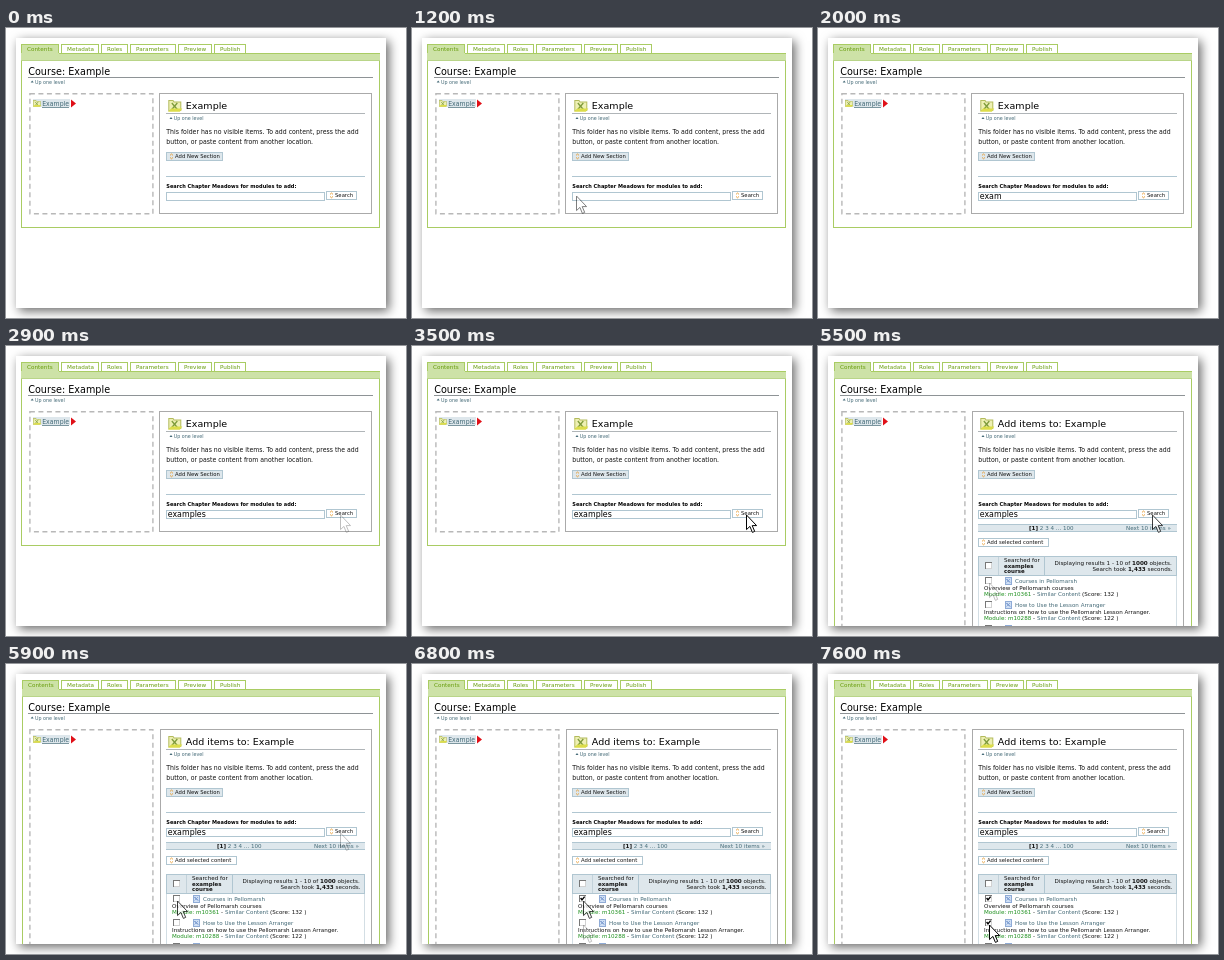
Write an HTML page with a canvas that moves like this. It is 400 by 290 pixels and loops after 8 s.

```html
<!DOCTYPE html>
<html lang="en">
<head>
<meta charset="utf-8">
<title>Adding content to a course</title>
<style>
html, body { margin: 0; width: 100%; height: 100%; overflow: hidden; background: #fff; }
canvas { display: block; width: 400px; height: 290px; }
</style>
</head>
<body>
<canvas id="stage" width="400" height="290"></canvas>
<script>
const LOOP = 8000, STEP = 200;
const LINK = '#436976', INK = '#111', GREEN = '#669c0a', LEAF = '#cde2a7', EDGE = '#a9cc63';
const SKY = '#dee7ec', SKY_EDGE = '#b0c6d1', GRAY = '#aaaaaa', MODULE = '#1c8f1c', ORANGE = '#e89a2c';
const ctx = document.getElementById('stage').getContext('2d');

// Text is laid out ten times larger and scaled down, so small sizes keep exact spacing.
function text(str, x, y, size, color = INK, bold = false) {
  ctx.save();
  ctx.translate(x, y);
  ctx.scale(0.1, 0.1);
  ctx.font = `${bold ? 'bold ' : ''}${size * 10}px "DejaVu Sans", Verdana, sans-serif`;
  ctx.fillStyle = color;
  ctx.fillText(str, 0, 0);
  const width = ctx.measureText(str).width / 10;
  ctx.restore();
  return x + width;
}

// Each part is [string, color, bold].
function run(parts, x, y, size) {
  for (const [str, color, bold] of parts) x = text(str, x, y, size, color, bold);
}

function rect(x, y, w, h, color) {
  ctx.fillStyle = color;
  ctx.fillRect(x, y, w, h);
}

function box(x, y, w, h, fill, edge) {
  rect(x, y, w, h, edge);
  rect(x + 1, y + 1, w - 2, h - 2, fill);
}

function shape(points, fill, c = ctx) {
  c.beginPath();
  points.forEach(([x, y]) => c.lineTo(x, y));
  c.closePath();
  c.fillStyle = fill;
  c.fill();
}

function line(points, color, width, c = ctx) {
  c.beginPath();
  points.forEach(([x, y]) => c.lineTo(x, y));
  c.strokeStyle = color;
  c.lineWidth = width;
  c.stroke();
}

function tab(name, x, w, active) {
  box(x, 16, w, 11, active ? LEAF : '#fff', EDGE);
  text(name, x + 6, 23, 5.7, GREEN);
}

function upLink(x, y) {
  shape([[x, y - 1], [x + 1.5, y - 3], [x + 3, y - 1]], LINK);
  text('Up one level', x + 4.2, y, 4.8, LINK);
}

function folder(x, y, s) {
  ctx.save();
  ctx.translate(x, y);
  ctx.scale(s, s);
  shape([[1, 1], [6, 1], [7, 2.5], [14, 2.5], [14, 12], [1, 12]], '#b3bb5c');
  shape([[2, 2], [5.5, 2], [6.5, 3.5], [13, 3.5], [13, 11], [2, 11]], '#eef0b4');
  line([[4.5, 4], [10, 10.5]], '#7d9a3a', 1.3);
  line([[10, 4], [4.5, 10.5]], '#7d9a3a', 1.3);
  shape([[0.5, 12.7], [4, 9.5], [15, 9.5], [12.5, 12.7]], '#dcdd4a');
  ctx.restore();
}

function button(label, x, y, w, fill) {
  box(x, y, w, 9, fill, SKY_EDGE);
  line([[x + 4, y + 3.4], [x + 5.5, y + 2], [x + 7, y + 3.4]], ORANGE, 0.9);
  line([[x + 4, y + 5.4], [x + 5.5, y + 6.8], [x + 7, y + 5.4]], ORANGE, 0.9);
  text(label, x + 9, y + 6.2, 5.3);
}

function checkbox(x, y, checked) {
  box(x, y, 7, 7, '#fff', '#d2d2d2');
  rect(x, y, 7, 1, '#777');
  rect(x, y, 1, 7, '#777');
  if (checked) line([[x + 1.6, y + 3], [x + 3, y + 4.9], [x + 5.6, y + 1.6]], '#000', 1.4);
}

function moduleIcon(y) {
  box(187, y, 7, 8, '#cfdff5', '#8fabd6');
  line([[188.5, y + 2], [192, y + 5.5]], '#4a73b8', 1);
  line([[192, y + 2], [188.5, y + 5.5]], '#7d9ed2', 0.8);
}

function result(y, title, summary, id, score, checked) {
  checkbox(167, y + 2, checked);
  moduleIcon(y + 2);
  text(title, 197, y + 7.7, 5.6, LINK);
  text(summary, 166, y + 14.8, 5.6);
  run([[`Module: ${id}`, MODULE], [' - ', INK], ['Similar Content', LINK],
       [` (Score: ${score} )`, INK]], 166, y + 21, 5.6);
}

function results(checks) {
  rect(160, 178, 199, 8, SKY);
  rect(160, 178, 199, 1, SKY_EDGE);
  rect(160, 185, 199, 1, SKY_EDGE);
  run([['[1]', INK, true], [' 2 3 4 ... 100', LINK]], 211, 184, 5.6);
  text('Next 10 items »', 308, 184, 5.65, LINK);
  button('Add selected content', 160, 192, 71, '#fff');

  box(160, 210, 199, 80, '#fff', '#d3dee4');
  box(160, 210, 199, 20, SKY, SKY_EDGE);
  rect(180, 211, 1, 18, '#c3d2da');
  rect(226, 211, 1, 18, SKY_EDGE);
  checkbox(167, 216, false);
  text('Searched for', 186, 215.7, 5.6);
  text('examples', 186, 221.5, 5.5, INK, true);
  text('course', 186, 227.3, 5.5, INK, true);
  run([['Displaying results 1 - 10 of '], ['1000', INK, true], [' objects.']], 236.5, 219, 5.65);
  run([['Search took '], ['1,433', INK, true], [' seconds.']], 274.5, 225, 5.65);

  result(229, 'Courses in Pellomarsh', 'Overview of Pellomarsh courses', 'm10361', 132, checks > 0);
  result(253, 'How to Use the Lesson Arranger',
    'Instructions on how to use the Pellomarsh Lesson Arranger.', 'm10288', 122, checks > 1);
  checkbox(167, 279, false);
  moduleIcon(279);
}

function page(typed, found, checks) {
  const left = found ? 16 : 15, panel = found ? 154 : 153;
  rect(0, 0, 400, 290, '#fff');
  ctx.save();
  ctx.shadowColor = 'rgba(0,0,0,.6)';
  ctx.shadowBlur = 10;
  ctx.shadowOffsetX = ctx.shadowOffsetY = 3;
  rect(10, 10, 370, 270, '#fff');
  ctx.restore();

  ctx.save();
  ctx.beginPath();
  ctx.rect(10, 10, 370, 270);
  ctx.clip();

  box(left, 25, 374 - left, found ? 300 : 175, '#fff', EDGE);
  tab('Contents', left, 53 - left, true);
  tab('Metadata', 55, 38);
  tab('Roles', 95, 27);
  tab('Parameters', 124, 46);
  tab('Preview', 172, 34);
  tab('Publish', 208, 32);
  rect(left, 25, 374 - left, 8, LEAF);
  rect(53, 25, 321, 1, EDGE);
  rect(left, 32, 374 - left, 1, '#b9d589');

  text('Course: Example', 22.2, 47, 9.65, '#000');
  rect(22, 49, 345, 1, '#8e9396');
  upLink(24.7, 55.5);

  ctx.setLineDash([5, 3.5]);
  ctx.strokeStyle = '#b8b8b8';
  ctx.lineWidth = 1.4;
  ctx.strokeRect(23.9, 65.7, 123, found ? 300 : 120);
  ctx.setLineDash([]);
  rect(27, 71, 37, 8, SKY);
  folder(26.5, 71.5, 0.58);
  text('Example', 36.2, 77.8, 6.2, LINK);
  rect(36, 79, 27, 0.7, LINK);
  shape([[65, 71.5], [70, 75.5], [65, 79.5]], '#e01018');

  box(panel, 65, 366 - panel, found ? 300 : 121, '#fff', GRAY);
  folder(161.3, 71, 1);
  text(found ? 'Add items to: Example' : 'Example', 179.8, 80.6, 9.55, '#000');
  rect(160, 85, 199, 1, '#b0b5b8');
  upLink(163.5, 92);
  text('This folder has no visible items. To add content, press the add', 160.3, 106, 6.2);
  text('button, or paste content from another location.', 160.3, 116, 6.2);
  button('Add New Section', 160, 124, 57, SKY);
  rect(160, 148, 199, 1, SKY_EDGE);

  text('Search Chapter Meadows for modules to add:', 160.3, 159.6, 5.05, '#000', true);
  box(160, 164, 159, 9, '#fff', SKY_EDGE);
  text('examples'.slice(0, typed), 161.7, 171, 7.9, '#000');
  button('Search', 320, 163, 31, '#fff');
  if (found) results(checks);
  ctx.restore();
}

const arrow = document.createElement('canvas');
arrow.width = 13;
arrow.height = 21;
{
  const c = arrow.getContext('2d');
  const outline = [[.5, 1], [.5, 15.6], [3.9, 12.4], [6.4, 18.4], [8.7, 17.4], [6.2, 11.6], [10.6, 11.6]];
  shape(outline, '#fff', c);
  line([...outline, outline[0]], '#000', 1, c);
}

// Fades run in four even steps.
const fade = (t, start) => Math.max(0, Math.min(1, (Math.floor((t - start) / STEP) + 1) / 4));

function pointer(x, y, alpha) {
  ctx.globalAlpha = alpha;
  ctx.drawImage(arrow, x, y);
  ctx.globalAlpha = 1;
}

function draw() {
  const t = performance.now() % LOOP;
  const typed = t < 1800 ? 0 : Math.min(8, 2 * Math.floor((t - 1800) / STEP) + 2);
  page(typed, t >= 4500, (t >= 6300) + (t >= 7600));
  if (t < 1800) pointer(164, 167, fade(t, 1000));
  pointer(334, 168, fade(t, 2900) * (1 - fade(t, 5500)));
  pointer(171, 236, fade(t, 5500) * (1 - fade(t, 6800)));
  pointer(171, 260, fade(t, 6800));
  requestAnimationFrame(draw);
}
draw();
</script>
</body>
</html>
```
